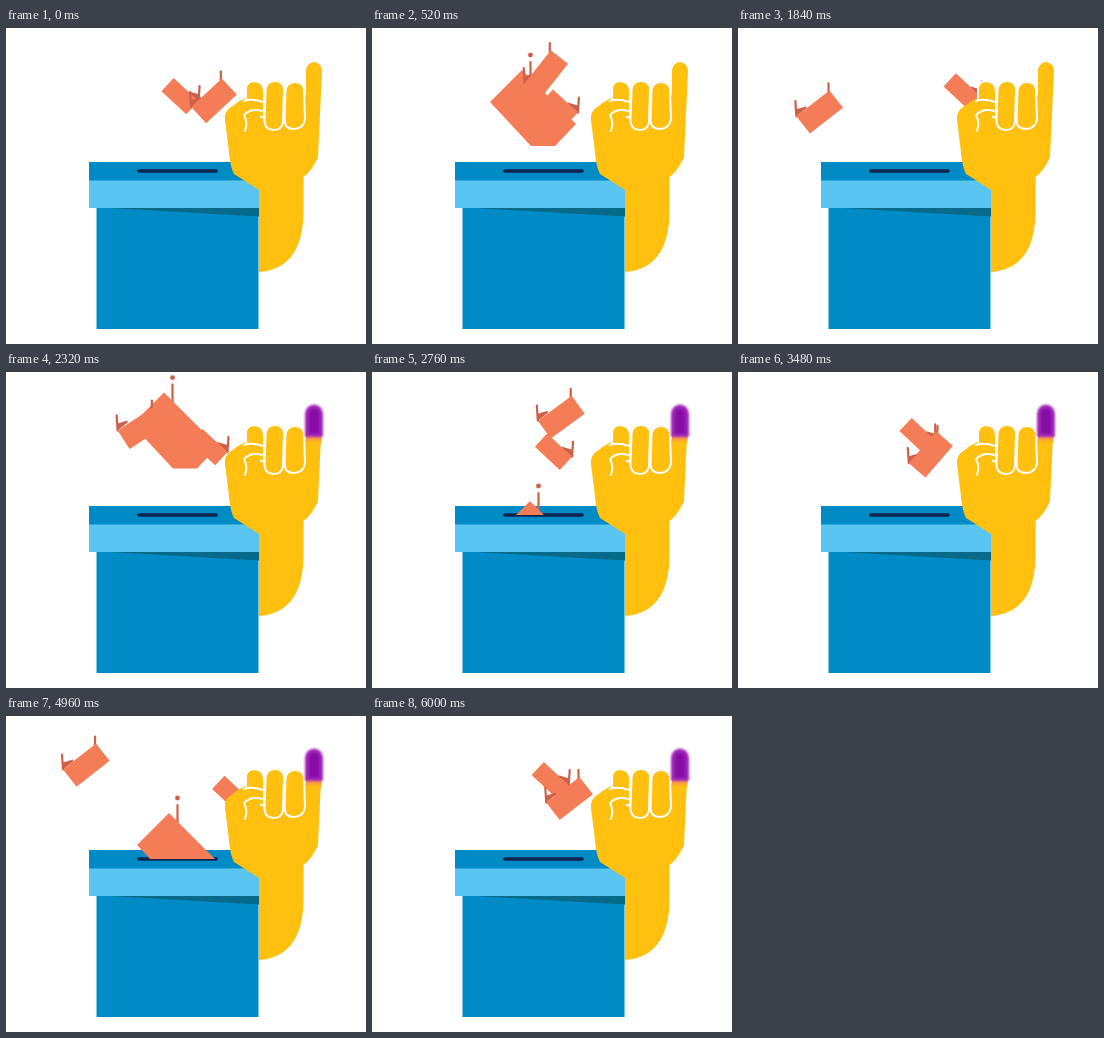
These frames come from a looping animation (360 by 316 pixels, 6.04 s). An HTML page:

```html
<!DOCTYPE html>
<html lang="en">
<head>
<meta charset="utf-8">
<title>Voting</title>
<style>
  html, body { margin: 0; width: 100%; height: 100%; overflow: hidden; background: #fff; }
  svg { display: block; width: 360px; height: 316px; }
  .paper { fill: #f47d57; }
  .fold { fill: #cc6049; }
  .tick { stroke: #cc6049; stroke-width: 2.2; stroke-linecap: round; fill: none; }
  .seam { stroke: #fff; stroke-width: 2; stroke-linecap: round; stroke-linejoin: round; }
</style>
</head>
<body>
<svg viewBox="0 0 360 316">
  <defs>
    <clipPath id="aboveSlot"><rect width="360" height="143"/></clipPath>
    <linearGradient id="inkFade" x2="0" y2="1">
      <stop offset="0" stop-color="#f58a55"/>
      <stop offset="1" stop-color="#ffc010"/>
    </linearGradient>
    <filter id="soft" x="-40%" y="-30%" width="180%" height="160%">
      <feGaussianBlur stdDeviation="1.3"/>
    </filter>
  </defs>

  <g id="box">
    <path fill="#008bc6" d="M90.500 180H252.500V301H90.500ZM83 134H253V153H83Z"/>
    <path fill="#5bc5f2" d="M83 152.500H253V180H83Z"/>
    <path fill="#076a88" d="M104 180H253V188.500Z"/>
    <path stroke="#10244f" stroke-width="3.600" stroke-linecap="round" d="M133 143H210"/>
  </g>

  <g clip-path="url(#aboveSlot)">
    <g id="ballot">
      <path class="tick" stroke-width="3" d="M8.500 -8V12"/>
      <circle class="fold" cx="8.500" cy="-15" r="2.400"/>
      <path class="paper" d="M0 0L54 54L33 76H9L-32 32Z"/>
    </g>
  </g>
  <g id="rightSlip"></g>
  <g id="leftSlip"></g>

  <g id="hand" fill="#ffc010">
    <path d="M300 43a8 9 0 0 1 16 0L312 129Q306 143 297.500 149V186Q296 241 253 244V162L228 146Q224 139 222.500 120L219 92Q218 83 227 78L239 70L258 73L300 67Z"/>
    <path class="seam" d="M240 76V62Q240 53 248.500 53Q258 54 258 63V90Q250 88 240 76Z"/>
    <path d="M219 92Q218 83 227 78Q235 70 244 71L257 75V84L250 94L238 105Z"/>
    <path class="seam" fill="none" d="M238 73Q246 70 257 74M256 83Q245 80 238 87Q242 95 239 103"/>
    <path class="seam" d="M258.500 93L259.500 62Q260.500 53 269 53Q278 53 278 62L277 94Q276 102 267.500 102Q258.500 101 258.500 93Z"/>
    <path class="seam" d="M278.500 92L279.500 63Q280.500 54 289 54Q298 54 298 63L299 91Q298 100 288.500 101Q278.500 101 278.500 92Z"/>
  </g>
  <g id="ink">
    <path fill="url(#inkFade)" d="M300 64H315.500V71H300Z"/>
    <path fill="#a32cc0" filter="url(#soft)" d="M299 65V42a9 9.500 0 0 1 18 0V65Z"/>
    <path fill="#8710a6" filter="url(#soft)" d="M302.500 62V42a5.500 6 0 0 1 11 0V62Z"/>
  </g>
</svg>
<script>
const LOOP = 6040, STEP = 40;
const SWAY = 3140, BOB = 2060, BOB_PEAK = 620;
const BLINK_START = 820, BLINK_HALF = 320;
const $ = id => document.getElementById(id);
const wave = (t, period) => 2 * Math.PI * t / period;

// Each drop: top-corner x, then [time, top-corner y] pairs.
const drops = [
  { x: 150, keys: [[40, -76], [520, 42], [640, 67], [1080, 146]] },
  { x: 158, keys: [[1960, -76], [2400, 42], [2640, 97], [2760, 129], [2840, 146]] },
  { x: 163, keys: [[4180, -76], [4480, 42], [4960, 97], [5280, 146]] }
];

function keyed(keys, t) {
  const i = keys.findIndex(key => key[0] > t);
  if (i < 1) return null;
  const [t0, v0] = keys[i - 1], [t1, v1] = keys[i];
  return v0 + (v1 - v0) * (t - t0) / (t1 - t0);
}

// A tilted slip whose upright ticks stay vertical while the paper turns.
function slip(cx, cy, length, width, degrees, foldOnRight) {
  const a = degrees * Math.PI / 180;
  const corner = (u, v) => [
    cx + u * length / 2 * Math.cos(a) - v * width / 2 * Math.sin(a),
    cy + u * length / 2 * Math.sin(a) + v * width / 2 * Math.cos(a)
  ];
  const nearLeft = corner(-1, -1), nearRight = corner(1, -1);
  const points = [nearLeft, nearRight, corner(1, 1), corner(-1, 1)];
  const [fx, fy] = foldOnRight ? nearRight : nearLeft;
  const inward = foldOnRight ? -1 : 1;
  const fold = `<path class="fold" d="M${fx} ${fy}v-7l${inward * 10} -3v2z"/>
    <path class="tick" d="M${fx} ${fy}l${-inward} -15"/>`;
  const [tx, ty] = nearRight;
  const tip = foldOnRight ? '' : `<path class="tick" d="M${tx - 1} ${ty + 2}v-9"/>`;
  return `${fold}${tip}<polygon class="paper" points="${points.join(' ')}"/>`;
}

function draw(t) {
  const sway = wave(t, SWAY), bob = Math.cos(wave(t - BOB_PEAK, BOB));
  $('leftSlip').innerHTML = slip(140 + 68 * Math.cos(sway), 66 - 21.5 * bob,
    42, 22, -43 - 10 * Math.sin(sway), false);
  $('rightSlip').innerHTML = slip(201 - 27 * Math.cos(sway), 71 + 9 * bob,
    34, 18, 43, true);

  const drop = drops.find(d => keyed(d.keys, t) !== null);
  $('ballot').style.display = drop ? '' : 'none';
  if (drop) $('ballot').setAttribute('transform', `translate(${drop.x} ${keyed(drop.keys, t)})`);

  const inked = t >= BLINK_START && Math.floor((t - BLINK_START) / BLINK_HALF) % 2 === 0;
  $('ink').style.display = inked ? '' : 'none';
}

const start = performance.now();
function tick() {
  const t = (performance.now() - start) % LOOP;
  draw(Math.floor(t / STEP) * STEP);
  requestAnimationFrame(tick);
}
tick();
</script>
</body>
</html>
```
